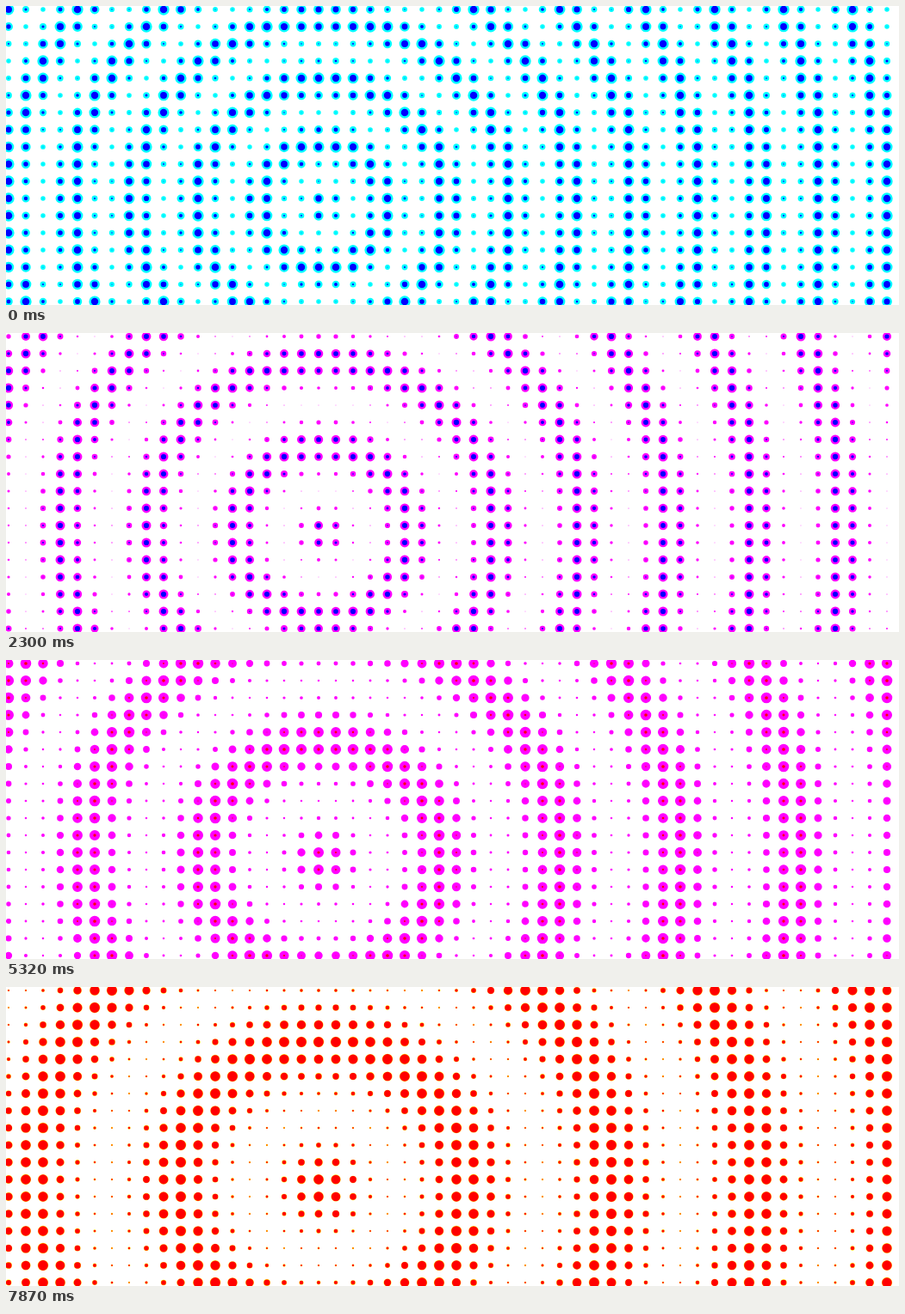
These frames come from a looping animation (1037 by 348 pixels, 7.95 s). An HTML page with a canvas:

```html
<!DOCTYPE html>
<html>
<head>
<meta charset="utf-8">
<title>Halftone ripple</title>
<style>
html, body { margin: 0; width: 100%; height: 100%; overflow: hidden; background: #fff; }
canvas { display: block; }
</style>
</head>
<body>
<canvas id="stage" width="1037" height="348"></canvas>
<script>
const ctx = document.getElementById('stage').getContext('2d');
const W = 1037, H = 348, GAP = 20, LOOP = 7950, STEPS = 100;
const CX = 367.5, CY = 232.5;
const SHORT = [4, 9, 41, 48, 79]; // steps lasting 70 ms instead of 80

// Mean dot radius of each ink, and ripple height, as [step, value] keys
const INKS = [
  ['#0ff', [[0, 4.7], [15, 2.8], [29, 0.6], [41, -2.6]]],
  ['#f0f', [[0, 2.3], [15, 2.6], [29, 3], [41, 3.5], [57, 3.7], [77, 3.8], [99, 3.35]]],
  ['#ff0', [[57, -2.6], [77, 1.2], [99, 3.7]]]
];
const HEIGHT = [[0, 2], [15, 2.4], [29, 2.55]];

function valueAt(keys, s) {
  if (s <= keys[0][0]) return keys[0][1];
  for (let i = 1; i < keys.length; i++) {
    const [s0, v0] = keys[i - 1], [s1, v1] = keys[i];
    if (s <= s1) return v0 + (v1 - v0) * (s - s0) / (s1 - s0);
  }
  return keys[keys.length - 1][1];
}

function stepAt(ms) {
  let s = 0;
  for (let end = 0; s < STEPS - 1; s++) {
    end += SHORT.includes(s) ? 70 : 80;
    if (ms < end) break;
  }
  return s;
}

function draw(s) {
  const k = 2 * Math.PI / (72.7 + 0.965 * s);
  const height = valueAt(HEIGHT, s);
  ctx.globalCompositeOperation = 'source-over';
  ctx.fillStyle = '#fff';
  ctx.fillRect(0, 0, W, H);
  ctx.globalCompositeOperation = 'multiply';
  for (const [color, keys] of INKS) {
    const base = valueAt(keys, s);
    ctx.fillStyle = color;
    ctx.beginPath();
    for (let y = 4; y < H; y += GAP) {
      for (let x = 3; x < W - 10; x += GAP) {
        const r = base + height * Math.cos(k * Math.hypot(x - CX, y - CY));
        if (r <= 0) continue;
        ctx.moveTo(x + r, y);
        ctx.arc(x, y, r, 0, 2 * Math.PI);
      }
    }
    ctx.fill();
  }
}

const start = performance.now();
let shown = -1;
function tick() {
  const s = stepAt((performance.now() - start) % LOOP);
  if (s !== shown) draw(shown = s);
  requestAnimationFrame(tick);
}
tick();
</script>
</body>
</html>
```
